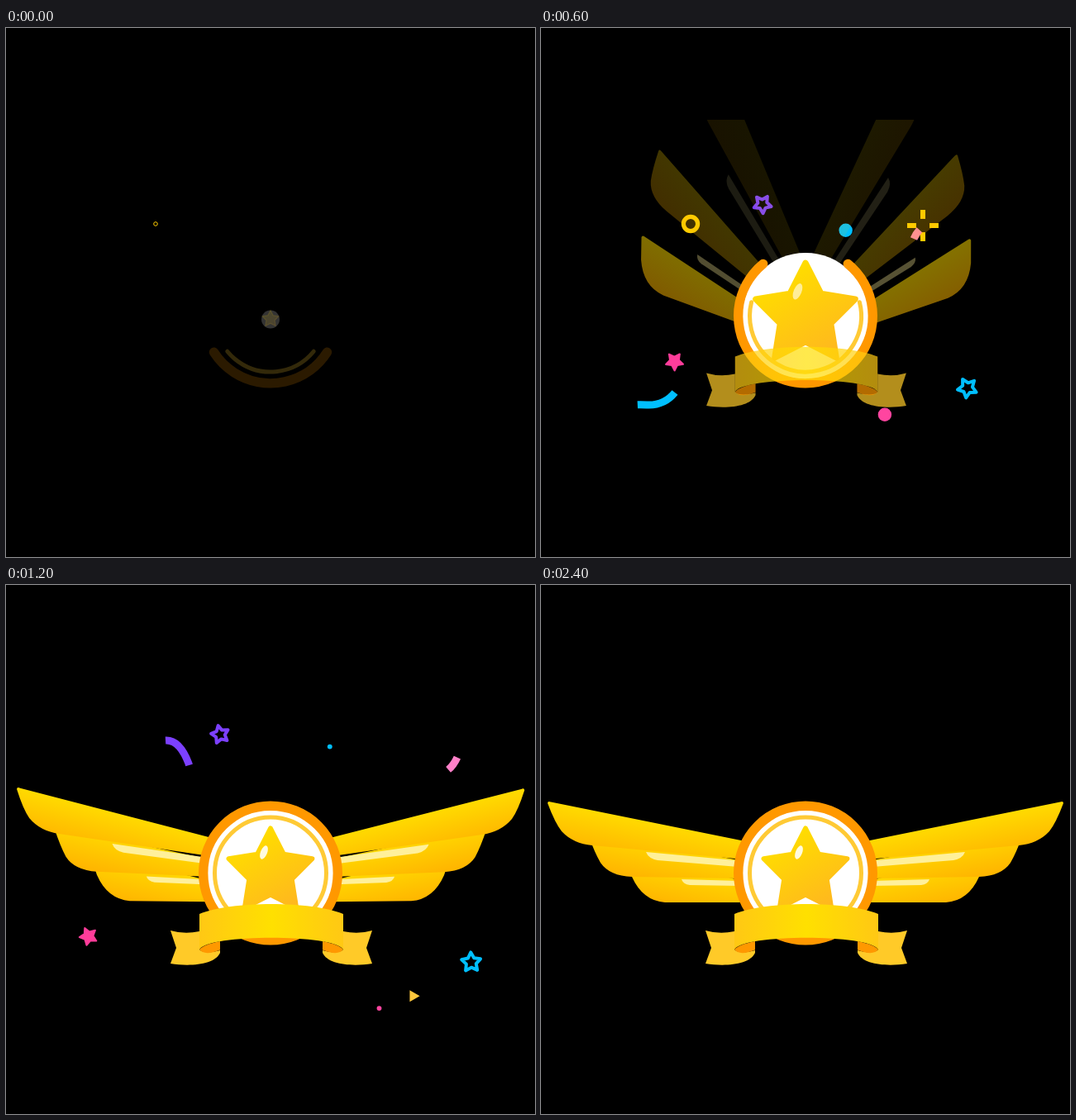
An HTML page with a canvas for the animation above (2500 ms loop, 640x640 px).

```html
<!DOCTYPE html>
<html>
<head>
<meta charset="utf-8">
<style>
html, body { margin: 0; height: 100%; overflow: hidden; background: #000; }
canvas { display: block; }
</style>
</head>
<body>
<canvas id="stage" width="640" height="640"></canvas>
<script>
const ctx = document.getElementById('stage').getContext('2d');
const CX = 320, CY = 348, LOOP = 2500, STEP = 100, RAD = Math.PI / 180;
const YELLOW = '#ffcc00', PURPLE = '#7c40ff', CYAN = '#00bfff', PINK = '#ff3d9a';

const clamp = u => Math.max(0, Math.min(1, u));
const ramp = (t, from, to) => clamp((t - from) / (to - from));
const mix = (a, b, u) => a + (b - a) * u;
const easeOut = (u, power) => 1 - (1 - u) ** power;

function layer(alpha, draw) {
  if (alpha <= 0) return;
  ctx.save();
  ctx.globalAlpha = Math.min(1, alpha);
  draw();
  ctx.restore();
}

function gradient(x0, y0, x1, y1, ...colors) {
  const g = ctx.createLinearGradient(x0, y0, x1, y1);
  colors.forEach((c, i) => g.addColorStop(i / (colors.length - 1), c));
  return g;
}

function dot(x, y, r, color) {
  if (r <= 0) return;
  ctx.fillStyle = color;
  ctx.beginPath();
  ctx.arc(x, y, r, 0, 7);
  ctx.fill();
}

// Regular polygon, or a star when an inner radius is given
function shape(n, R, r, turn) {
  const p = new Path2D(), count = r ? n * 2 : n;
  for (let i = 0; i < count; i++) {
    const a = turn * RAD + i * 2 * Math.PI / count, d = r && i % 2 ? r : R;
    p.lineTo(d * Math.cos(a), d * Math.sin(a));
  }
  p.closePath();
  return p;
}

// ---- confetti ----
// Progress of a piece thrown out of the medal at the given time
const flight = (t, start) => easeOut(ramp(t, start, start + 1500), 4);

function flyingStar(t, color, start, dx, dy, { R = 11, line = 4, tilt = 0, bend = 0, solid = false }) {
  layer(1 - ramp(t, 1300, 2000), () => {
    const e = flight(t, start), k = ramp(t, start, 400);
    if (!k) return;
    ctx.translate(CX + dx * e - bend * Math.sin(Math.PI * ramp(t, start, 1600)), CY + dy * e);
    const p = shape(5, R * k, R * k * .52, tilt + 14 - 160 * e - t * .025);
    ctx.strokeStyle = ctx.fillStyle = color;
    ctx.lineWidth = line * k;
    ctx.lineJoin = 'round';
    ctx.stroke(p);
    if (solid) ctx.fill(p);
  });
}

function flyingDot(t, color, start, dx, dy) {
  const e = flight(t, start);
  if (e) dot(CX + dx * e, CY + dy * e, 13.5 - t * .0088, color);
}

function growingRing(t) {
  const w = Math.min(5.2, 1 + t / 85, (1100 - t) / 55);
  if (w <= 0) return;
  ctx.strokeStyle = YELLOW;
  ctx.lineWidth = w;
  ctx.beginPath();
  ctx.arc(181, 237, 2.3 + t * .0105, 0, 7);
  ctx.stroke();
}

function dashCross(x, y, age) {
  const inner = 7 + 12 * ramp(age, 0, 900) ** 3, outer = 19 * easeOut(ramp(age, 0, 450), 3);
  if (outer <= inner) return;
  ctx.fillStyle = YELLOW;
  for (let i = 0; i < 4; i++) {
    ctx.save();
    ctx.translate(x, y);
    ctx.rotate(i * Math.PI / 2);
    ctx.fillRect(inner, -3, outer - inner, 6);
    ctx.restore();
  }
}

// A paper strip whose head, then tail, runs along a path
function streamer(d, color, length, age) {
  const head = length * ramp(age, 0, 450), tail = length * ramp(age, 290, 720);
  if (head <= tail) return;
  ctx.save();
  ctx.strokeStyle = color;
  ctx.lineWidth = 9;
  ctx.setLineDash([head - tail, 999]);
  ctx.lineDashOffset = -tail;
  ctx.stroke(new Path2D(d));
  ctx.restore();
}

function triangle(t) {
  const R = 18 * ramp(t, 1050, 2150) ** .4, hole = ramp(t, 1550, 2200);
  if (!R || hole === 1) return;
  const turn = (t - 1200) * .145, p = shape(3, R, 0, turn);
  p.addPath(shape(3, R * hole, 0, turn));
  ctx.save();
  ctx.translate(492.5, 497.3);
  ctx.fillStyle = '#ffc83c';
  ctx.fill(p, 'evenodd');
  ctx.restore();
}

function confetti(t) {
  growingRing(t);
  dashCross(462, 239, t - 200);
  dashCross(178, 468, t - 1350);
  flyingDot(t, '#ff45a0', 190, 133, 166);
  flyingDot(t, CYAN, 240, 73, -155);
  streamer('M162 441Q149 457 128 456Q104 454 93 464', CYAN, 80, t - 320);
  streamer('M451 255Q464 226 510 230Q536 233 547 206', '#ff80c8', 114, t - 550);
  streamer('M237 223Q227 241 221 216Q210 187 193 188', PURPLE, 72, t - 750);
  flyingStar(t, PURPLE, 100, -53, -168, { bend: 11 });
  flyingStar(t, PINK, 200, -223, 78, { tilt: -12, line: 2, solid: true });
  flyingStar(t, CYAN, 100, 244, 109, { tilt: 11, R: 12 });
  triangle(t);
}

// ---- wings: parts in open pose, lead = head start in ms ----
const PARTS = [
  { lead: 250, shade: 336, d: 'M101 327Q101 324 104 325L240 357L300 371L300 384L150 384Q123 382 110 353Z' },
  { lead: 140, d: 'M170 356L240 358L240 364L180 363Q172 362 170 356Z' },
  { lead: 100, shade: 311, d: 'M57 302Q56 299 60 300L240 333L300 344L300 356L110 353Q83 352 72 336Q65 324 57 302Z' },
  { lead: 0, shade: 290, d: 'M8 264Q8 261 12 262.5L242 309L300 321L300 337L62 315Q39 313 25 298Q17 288 8 264Z' },
  { lead: 10, d: 'M127 323L245 334L245 341.5L141 333Q130 331 127 323Z' }
];
for (const p of PARTS) {
  p.path = new Path2D(p.d);
  p.fill = p.shade ? gradient(150, p.shade, 141, p.shade + 46, '#ffda00', '#ffb600') : '#fff09a';
}

// Fold angle in degrees, dying away ever faster
function foldAngle(clock) {
  const x = (clock - 600) / 100;
  return 56 * Math.exp(-.36 * x - .02 * x * x);
}

function wing(t, side) {
  for (const p of PARTS) {
    const clock = t + p.lead + (side < 0 ? 12 : 0);
    layer(ramp(clock, 540, 1160), () => {
      ctx.translate(CX, CY);
      ctx.scale(side, 1);
      ctx.rotate(foldAngle(clock) * RAD);
      ctx.translate(-CX, -CY);
      ctx.fillStyle = p.fill;
      ctx.fill(p.path);
    });
  }
}

// ---- medal ----
function arcRing(r, width, half, color, alpha) {
  layer(alpha, () => {
    const h = Math.min(180, half);
    ctx.strokeStyle = color;
    ctx.lineWidth = width;
    ctx.lineCap = 'round';
    ctx.beginPath();
    ctx.arc(CX, CY + .5, r, (90 - h) * RAD, (90 + h) * RAD);
    ctx.stroke();
  });
}

function medalStar(t, grow) {
  layer(.12 + t / 560, () => {
    const u = ramp(t, 400, 1200);
    const k = mix(.2, 1, grow) + .26 * Math.sin(Math.PI * Math.sqrt(u)) * (1 - u);
    ctx.translate(CX, mix(352, 347.5, grow));
    ctx.scale(k, k);
    ctx.fillStyle = ctx.strokeStyle = gradient(-22, -40, 25, 40, '#ffdc00', '#ffb81e');
    ctx.lineWidth = 6;
    ctx.lineJoin = 'round';
    const star = shape(5, 53, 27, -90);
    ctx.fill(star);
    ctx.stroke(star);
    ctx.globalAlpha *= ramp(t, 200, 800);
    ctx.fillStyle = '#fffbe0';
    ctx.beginPath();
    ctx.ellipse(-8, -24, 4, 8.6, 22 * RAD, 0, 7);
    ctx.fill();
  });
}

function medal(t) {
  const grow = ramp(t, 0, 400);
  layer(mix(.2, 1, grow), () => dot(CX, mix(352.5, 348.5, grow), mix(11, 76.5, grow), '#fff'));
  arcRing(81.3, 11.4, 57.5 + t * .139, '#ff9800', mix(.17, 1, grow));
  arcRing(67.5, 5, Math.max(50.7, 24 + t * .134), '#ffca35', mix(.2, 1, grow));
  medalStar(t, grow);
}

// ---- ribbon ----
const TAIL = new Path2D('M199 418Q216 423 234 419L234 441Q240 447 259 442L259 445C253 459 224 462 199 458L206 439Z');
const FOLD = new Path2D('M234 441Q239 435 259 431L259 441.5Q240 449 234 441Z');
const BANNER = new Path2D('M234 398C272 382 370 382 408 398L408 441C398 422 244 422 234 441Z');

function ribbon(t) {
  const shown = ramp(t, 270, 740);
  layer(shown, () => {
    const k = 1 - .1 * (1 - shown) ** 2;
    ctx.translate(321, 350);
    ctx.scale(k, k);
    for (const side of [1, -1]) {
      ctx.save();
      ctx.scale(side, 1);
      ctx.translate(-321, -350);
      ctx.fillStyle = '#ffca28';
      ctx.fill(TAIL);
      ctx.fillStyle = '#ff9800';
      ctx.fill(FOLD);
      ctx.restore();
    }
    ctx.translate(-321, -350);
    ctx.fillStyle = gradient(234, 0, 408, 0, '#ffc814', '#ffe000', '#ffc814');
    ctx.fill(BANNER);
  });
}

let start;
function frame(now) {
  start ??= now;
  const t = Math.floor((now - start) % LOOP / STEP) * STEP;
  ctx.fillStyle = '#000';
  ctx.fillRect(0, 0, 640, 640);
  ctx.save();
  ctx.beginPath();
  ctx.rect(0, 111, 640, 529);
  ctx.clip();
  confetti(t);
  wing(t, 1);
  wing(t, -1);
  medal(t);
  ribbon(t);
  ctx.restore();
  requestAnimationFrame(frame);
}
requestAnimationFrame(frame);
</script>
</body>
</html>
```
